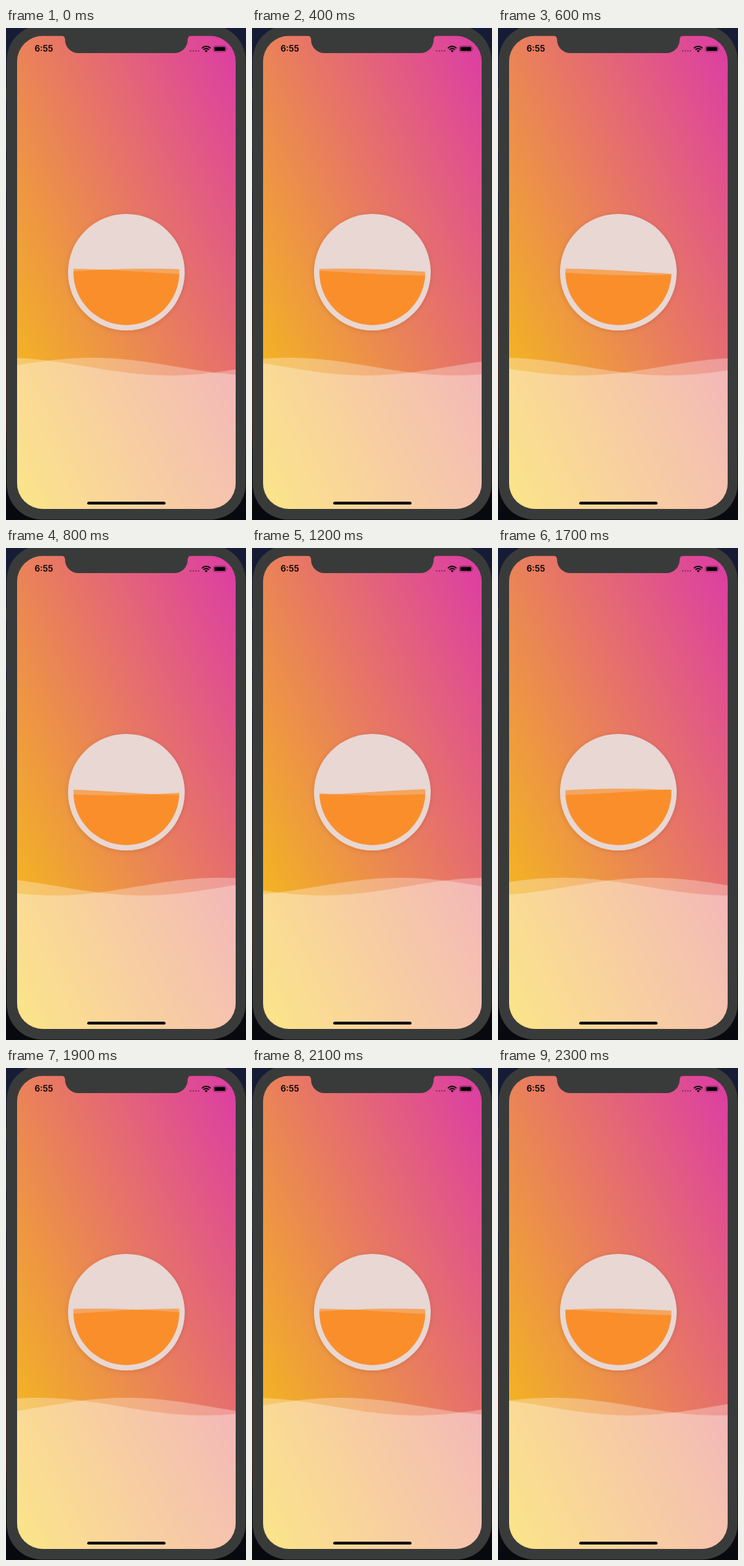
An HTML page that plays this animation: 325x667 px, repeating every 2.4 s.

```html
<!DOCTYPE html>
<html lang="en">
<head>
<meta charset="utf-8">
<title>Waves</title>
<style>
  html, body { margin: 0; width: 100%; height: 100%; overflow: hidden; background: #0b0d14; }
  svg { display: block; }
  text { font: 600 11.5px Inter, "Liberation Sans", sans-serif; }
</style>
</head>
<body>
<svg width="325" height="667" viewBox="0 0 325 667">
  <defs>
    <linearGradient id="sky" x1="0" y1="1" x2="1" y2="0">
      <stop stop-color="#f7c80c"/>
      <stop offset="1" stop-color="#dc3ca5"/>
    </linearGradient>
    <linearGradient id="desk" x2="0" y2="1">
      <stop stop-color="#161b36"/>
      <stop offset=".3" stop-color="#1b2034"/>
      <stop offset=".6" stop-color="#3a2420"/>
      <stop offset=".8" stop-color="#4a2418"/>
      <stop offset=".87" stop-color="#0c0c10"/>
      <stop offset="1" stop-color="#08090f"/>
    </linearGradient>
    <clipPath id="screen"><rect x="15" y="10.5" width="296" height="641.5" rx="35"/></clipPath>
    <clipPath id="bowl"><circle cx="163" cy="331" r="71.7"/></clipPath>
    <filter id="soft" x="-20%" y="-20%" width="140%" height="140%"><feGaussianBlur stdDeviation="3"/></filter>
  </defs>

  <!-- device -->
  <rect width="325" height="667" fill="url(#desk)"/>
  <path d="M0 80h2v20h-2zM0 126h2v40h-2zM0 180h2v40h-2z" fill="#2b2d30"/>
  <rect x="1" y="-4" width="323.5" height="670.5" rx="48" fill="#393b3a"/>

  <g clip-path="url(#screen)">
    <rect x="15" y="10.5" width="296" height="641.5" fill="url(#sky)"/>
    <g fill="#fff" fill-opacity=".3"><path id="sea0"/><path id="sea1"/></g>
    <circle cx="163" cy="332" r="79" fill="#703020" opacity=".22" filter="url(#soft)"/>
    <circle cx="163" cy="331" r="79" fill="url(#sky)"/>
    <circle cx="163" cy="331" r="79" fill="#e8d7d3"/>
    <g clip-path="url(#bowl)" fill="#ff7d00" fill-opacity=".55"><path id="juice0"/><path id="juice1"/></g>
  </g>

  <!-- notch and status bar -->
  <path d="M74 10H252Q246 10.500 246 16A18 18 0 0 1 228 34H98A18 18 0 0 1 80 16Q80 10.500 74 10Z" fill="#393b3a"/>
  <text x="38.700" y="32.300">6:55</text>
  <g fill="#000" fill-opacity=".4">
    <circle cx="250" cy="31" r="1.100"/><circle cx="253.600" cy="31" r="1.100"/>
    <circle cx="257.200" cy="31" r="1.100"/><circle cx="260.800" cy="31" r="1.100"/>
  </g>
  <g fill="none" stroke="#000" stroke-width="1.700">
    <path d="M265.300 27.300a8.200 8.200 0 0 1 11.600 0M267.400 29.500a5.200 5.200 0 0 1 7.400 0"/>
  </g>
  <path d="M271.100 33l-2-2.100a2.900 2.900 0 0 1 4 0z"/>
  <rect x="281" y="24.500" width="17" height="7.600" rx="2.200" fill="none" stroke="#000" stroke-opacity=".45" stroke-width=".8"/>
  <rect x="282.200" y="25.700" width="14.600" height="5.200" rx="1.200"/>
  <path d="M299 27q1.200 1.200 0 2.500z" fill-opacity=".5"/>
  <rect x="110" y="642.300" width="106" height="3.800" rx="1.900"/>
</svg>
<script>
const LOOP = 2400, STEP = 100, LENGTH = 450, SPREAD = 60;

// Midpoint between the two crests; the drift starts a little slower.
const drift = t => t < 400 ? 57 - 0.1675 * t : -10 - 0.2245 * (t - 400);

function wave(left, right, mid, amp, bottom, crest) {
  let d = `M${left} ${bottom}`;
  for (let x = left; x <= right; x += 4) {
    const y = mid - amp * Math.cos((x - crest) * 2 * Math.PI / LENGTH);
    d += `L${x} ${y.toFixed(2)}`;
  }
  return d + `V${bottom}Z`;
}

const set = (id, d) => document.getElementById(id).setAttribute("d", d);

function draw(t) {
  [-SPREAD, SPREAD].forEach((offset, i) => {
    const crest = drift(t) + offset;
    set("sea" + i, wave(15, 315, 459, 12, 652, crest));
    set("juice" + i, wave(91, 239, 330.7, 4.5, 405, crest + 76));
  });
}

const start = performance.now();
function tick() {
  const t = (performance.now() - start) % LOOP;
  draw(Math.floor(t / STEP) * STEP);
  requestAnimationFrame(tick);
}
tick();
</script>
</body>
</html>
```
